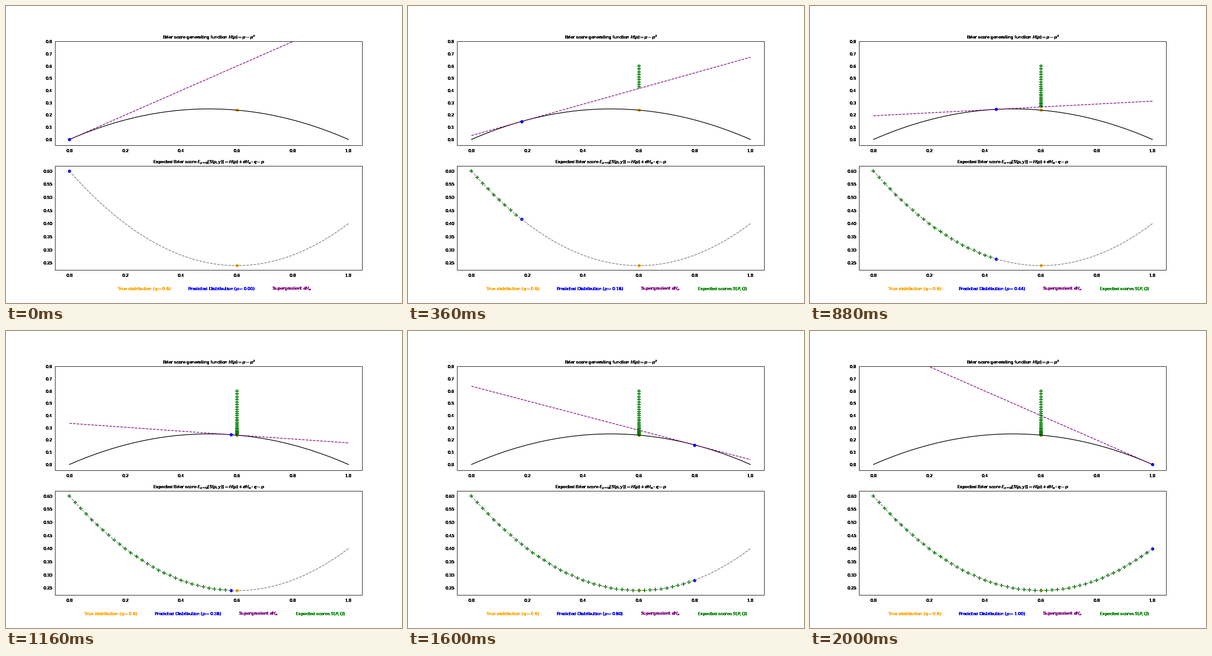
A matplotlib script for the animation above (2040 ms loop, 864 by 648 pixels).

```python
import numpy as np
import matplotlib.pyplot as plt
from matplotlib.animation import FuncAnimation
from matplotlib.patches import Rectangle
from matplotlib.transforms import Affine2D

W, H, DPI = 864, 648, 72
STEPS, INTERVAL = 51, 40
Q = 0.6

plt.rcParams.update({
    "font.family": "DejaVu Sans",
    "font.size": 9,
    "axes.titlesize": 9,
    "xtick.labelsize": 9,
    "ytick.labelsize": 9,
    "mathtext.fontset": "dejavusans",
})


def entropy(p):
    return p - p ** 2


def tangent(p, x):
    return entropy(p) + (1 - 2 * p) * (x - p)


def solid(rgba, dpi):
    """Turn soft glyph edges into full ink."""
    rgba[..., 3] = rgba[..., 3] > 0
    return rgba, 0, 0


def dot(ax, x, y, color, z):
    return ax.plot([x], [y], "o", color=color, ms=6, zorder=z)[0]


def crosses(ax):
    return ax.plot([], [], "+", color="green", ms=8, mew=2, zorder=1.5)[0]


def style(ax, title):
    ax.set_title(title)
    ax.tick_params(length=0, pad=7)
    ax.set_xlim(-0.05, 1.05)
    ax.spines[:].set_visible(False)
    # Border sits on the pixel just up and left of the axes edge
    shift = ax.transAxes + Affine2D().translate(-0.6, 0.6)
    ax.add_patch(Rectangle((0, 0), 1, 1, transform=shift, fill=False,
                           ec="black", lw=1, clip_on=False, zorder=2.5))
    for part in (ax.title, ax.xaxis, ax.yaxis):
        part.set_agg_filter(solid)


grid = np.linspace(0, 1, STEPS)
scores = tangent(grid, Q)

fig, (top, low) = plt.subplots(2, 1, figsize=(W / DPI, H / DPI), dpi=DPI)
fig.subplots_adjust(left=0.125, right=0.9, bottom=0.11, top=0.88, hspace=0.2)
style(top, "Brier score generating function $H(p) = p - p^2$")
style(low, r"Expected Brier score $E_{y \sim Q}[S(p, y)] = H(p) + dH_p \cdot q - p$")
top.set_ylim(-0.05, 0.8)
low.set_ylim(0.222, 0.618)

# Upper panel
dot(top, Q, entropy(Q), "orange", 1)
top_marks = crosses(top)
top.plot(grid, entropy(grid), color="black", lw=1.5, zorder=2)
slope, = top.plot([], [], "--", color="purple", lw=1.5, zorder=2)
top_dot = dot(top, 0, 0, "blue", 3)

# Lower panel
dot(low, Q, entropy(Q), "orange", 1)
low_marks = crosses(low)
low_dot = dot(low, 0, Q, "blue", 1.8)
low.plot(grid, scores, "--", color="gray", lw=1.5, zorder=2)

# Colour key below the panels
KEY = [
    (0, "orange", "True distribution ($q = 0.6$)"),
    (154.2, "blue", ""),
    (338.4, "purple", "Supergradient $dH_p$"),
    (461.7, "green", "Expected scores $S(P, Q)$"),
]
key = [fig.text(0, 28 / H, label, color=color, ha="left", va="baseline",
                agg_filter=solid)
       for _, color, label in KEY]


def update(i):
    p = grid[i]
    slope.set_data(grid, tangent(p, grid))
    top_dot.set_data([p], [entropy(p)])
    low_dot.set_data([p], [scores[i]])
    top_marks.set_data(np.full(i, Q), scores[:i])
    low_marks.set_data(grid[:i], scores[:i])

    # The key is recentred once the score marks appear
    start = 170 if i else 243
    for text, (offset, _, _) in zip(key, KEY):
        text.set_x((start + offset) / W)
    key[1].set_text(f"Predicted Distribution ($p = {p:.2f}$)")
    key[3].set_visible(i > 0)
    return [slope, top_dot, low_dot, top_marks, low_marks, *key]


anim = FuncAnimation(fig, update, frames=STEPS, interval=INTERVAL,
                     repeat=True, repeat_delay=0, blit=False)
plt.show()
```
